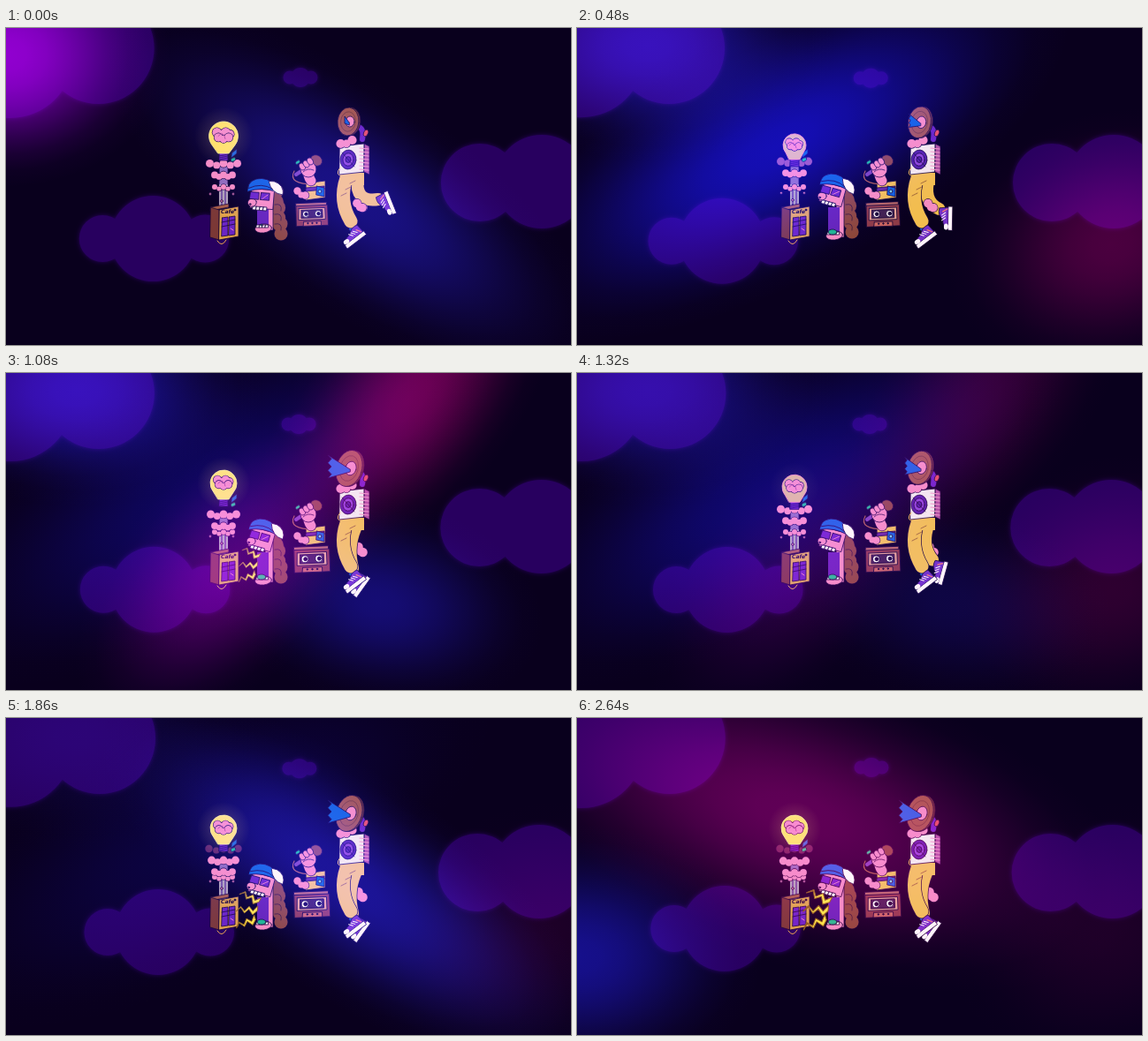
An HTML page with a canvas that plays this animation: 639x359 px, repeating every 2700 ms.

```html
<!DOCTYPE html>
<html lang="en">
<head>
<meta charset="utf-8">
<style>
html, body { margin: 0; width: 100%; height: 100%; overflow: hidden; background: #09001d; }
canvas { display: block; width: 639px; height: 359px; }
</style>
</head>
<body>
<canvas id="stage" width="639" height="359"></canvas>
<script>
const ctx = document.getElementById('stage').getContext('2d');
const LOOP = 2700, STEP = 60, BEAT = LOOP / 7, TAU = Math.PI * 2;
const INK = '#1b0733', PINK = '#f58cc0', BROWN = '#8d4734', PURPLE = '#6a25c4',
      YELLOW = '#f2bd4e', BLUE = '#145fe0', WHITE = '#fff4fa', GREEN = '#20b38c';

const mix = (a, b, k) => a + (b - a) * k;
const clamp = k => Math.min(1, Math.max(0, k));
const range = n => Array.from({ length: n }, (_, i) => i);
// Smooth bump: 1 at the peak, 0 beyond the half-width.
const bump = (x, peak, width) => Math.cos(clamp(Math.abs(x - peak) / width) * Math.PI / 2) ** 2;

function paint(fill, line = INK, width = 0.8) {
  if (fill) { ctx.fillStyle = fill; ctx.fill(); }
  if (line) { ctx.strokeStyle = line; ctx.lineWidth = width; ctx.stroke(); }
}
function poly(fill, points, line) {
  ctx.beginPath();
  points.forEach(([x, y]) => ctx.lineTo(x, y));
  ctx.closePath();
  paint(fill, line);
}
// Box whose right side is shifted vertically by skew.
function slab(fill, x, y, w, h, skew = 0, line = INK) {
  poly(fill, [[x, y], [x + w, y + skew], [x + w, y + skew + h], [x, y + h]], line);
}
function oval(fill, x, y, rx, ry = rx, turn = 0, line = INK) {
  ctx.beginPath();
  ctx.ellipse(x, y, rx, ry, turn, 0, TAU);
  paint(fill, line);
}
function curve(color, width, x0, y0, cx, cy, x1, y1) {
  ctx.beginPath();
  ctx.moveTo(x0, y0);
  ctx.quadraticCurveTo(cx, cy, x1, y1);
  paint(null, color, width);
}
const wire = (color, width, x0, y0, x1, y1) => curve(color, width, x0, y0, x0, y0, x1, y1);
function limb(color, width, ...path) {
  curve(INK, width + 1.4, ...path);
  curve(color, width, ...path);
}
// Row of merged balls along a shallow wave.
function puff(color, x, y, w, n, r, dy = 0) {
  const balls = range(n).map(i => {
    const k = i / (n - 1) - .5;
    return [x + k * w, y + k * dy + (i % 2 ? 1 : -1), r * (i % 2 ? 1 : 1.15)];
  });
  balls.forEach(([bx, by, br]) => oval(INK, bx, by, br + .6, br + .6, 0, null));
  balls.forEach(([bx, by, br]) => oval(color, bx, by, br, br, 0, null));
}
function at(x, y, turn, scale, draw) {
  ctx.save();
  ctx.translate(x, y);
  ctx.rotate(turn);
  ctx.scale(scale, scale);
  draw();
  ctx.restore();
}

function skyCloud(...balls) {
  ctx.fillStyle = ctx.shadowColor = '#28005f';
  ctx.shadowBlur = 5;
  ctx.beginPath();
  for (const [x, y, r] of balls) {
    ctx.moveTo(x + r, y);
    ctx.arc(x, y, r, 0, TAU);
  }
  ctx.fill();
  ctx.shadowBlur = 0;
}
function sky(t) {
  ctx.fillStyle = '#09001d';
  ctx.fillRect(0, 0, 639, 359);
  const sway = Math.cos(TAU * (t - 480) / LOOP), bob = Math.cos(TAU * (t - 1250) / LOOP);
  const x = 168 - 4 * sway, y = 242 + 3.5 * bob, far = 535 + 2 * sway, top = 57 + bob;
  skyCloud([5, 30 - bob, 71], [105 - sway, 23, 63]);
  skyCloud([320 - bob, top, 7.5], [332 - bob, top, 11], [344 - bob, top, 7.5]);
  skyCloud([x - 57, y, 26.5], [x, y, 48.5], [x + 59, y, 27]);
  skyCloud([far, 175, 44], [far + 70, 174, 53]);
}

function beam(rgb, x, y, rx, ry, turn, power) {
  if (power < .01) return;
  const glow = ctx.createRadialGradient(0, 0, 0, 0, 0, 1);
  range(9).forEach(i => glow.addColorStop(i / 8, `rgba(${rgb},${power * bump(i, 0, 8)})`));
  ctx.save();
  ctx.translate(x, y);
  ctx.rotate(turn);
  ctx.scale(rx, ry);
  ctx.fillStyle = glow;
  ctx.fillRect(-1, -1, 2, 2);
  ctx.restore();
}
function lights(t) {
  const near = peak => bump(t, peak, 450);
  const rising = clamp(near(480) + near(1020) * .45 + near(1560));
  const falling = clamp(near(0) * .85 + near(1860));
  const crimson = near(1080), finale = near(2700);
  ctx.globalCompositeOperation = 'screen';
  beam('12,14,172', 225, 135, 370, 150, -.5, rising);
  beam('20,18,150', 80, 20, 210, 130, 0, clamp(rising + crimson * .6));
  beam('20,20,140', 390, 190, 330, 125, .6, falling);
  beam('18,18,140', 420, 260, 190, 120, .2, crimson * .7);
  beam('105,0,58', 455, 30, 230, 120, -.9, crimson);
  beam('85,0,95', 260, 220, 230, 120, -.8, crimson * .9);
  beam('85,0,48', 605, 245, 190, 150, -.3, clamp(near(480) * .8 + near(1560) + near(2340)));
  beam('125,0,180', 0, 30, 185, 150, 0, near(0));
  beam('95,0,68', 250, 110, 400, 170, .3, finale);
  beam('14,16,130', 0, 270, 210, 150, 0, finale);
  ctx.globalCompositeOperation = 'source-over';
}

function bulb(y, r, lit) {
  const halo = ctx.createRadialGradient(246, y, r, 246, y, r * 2);
  halo.addColorStop(0, `rgba(255,210,90,${.12 * lit})`);
  halo.addColorStop(1, 'rgba(255,210,90,0)');
  oval(halo, 246, y, r * 2, r * 2, 0, null);
  const neck = y + r + 2, glass = lit > .5 ? '#ffe04f' : '#ddb27c';
  slab(PURPLE, 241, neck, 10, 9);
  range(3).forEach(i => wire(INK, .7, 241, neck + 4 + i * 2, 251, neck + 2 + i * 2));
  ctx.beginPath();
  ctx.arc(246, y, r, Math.PI * .78, Math.PI * .22);
  ctx.lineTo(252, neck + 1);
  ctx.lineTo(240, neck + 1);
  ctx.closePath();
  paint(glass, lit > .5 ? '#fff08a' : PINK);
  puff(PINK, 246, y - r * .2, r * .9, 4, r * .27);
  puff(PINK, 246, y + r * .15, r * .7, 3, r * .25);
  curve('#9c347e', .7, 240, y, 246, y - 7, 248, y + 3);
}
function cafeTower(beat, open) {
  const dip = bump(beat, .27, .35), late = bump(beat, .86, .1);
  const ring = 155 + 5 * open - 5 * dip + 3 * late;
  slab('#8f6bb8', 241, ring, 10, 48, 0);
  range(3).forEach(i => {
    wire(INK, 2.4, 242 + i * 4, 180, 242 + i * 4, 203);
    wire(WHITE, 1.3, 242 + i * 4, 178, 242 + i * 4, 203);
  });
  puff(PINK, 246, 181, 20, 5, 2.6);
  puff(PINK, 246, ring + 13, 20, 5, 3.4);
  if (late > .5) puff('#612547', 246, 149, 33, 5, 3.6);
  puff(dip > .8 ? '#98539a' : PINK, 246, ring, 31 - 6 * late, 5, 3.9);
  slab(BLUE, 255, 142, 6, 5, -5);
  oval(GREEN, 257, 149, 3, 2, -.5);
  bulb(121 + 12 * dip + 4 * open * (1 - dip), 17 - 4 * dip - 2 * open * (1 - dip), 1 - dip);
  range(3).forEach(i => oval(PINK, 231 + i * 13, 188 + i % 2 * 8 - open * 3, 1.4));

  slab('#a75d42', 231, 203, 21, 4, -4);
  slab('#7b3835', 231, 203, 10, 34, 3);
  slab('#dfa247', 241, 206, 22, 34, -4);
  ctx.fillStyle = INK;
  ctx.font = 'italic bold 6px "DejaVu Sans", sans-serif';
  ctx.fillText('Cafe', 243, 210);
  oval(INK, 259, 206, 1);
  [244, 252].forEach((x, i) => slab(PURPLE, x, 215 - i, 7, 21, -1));
  range(2).forEach(i => wire(INK, .8, 244, 220 + i * 5, 259, 217 + i * 5));
  wire(PINK, 1, 254, 227, 257, 229);
  curve('#e8a34d', 1, 239, 241, 244, 249, 249, 240);
}

// Tapered zigzag from a wide end to a point.
function bolt(x, y, length, turn) {
  at(x, y, turn, length / 22, () => {
    const edge = side => range(6).map(i => [-i * 4.4, (i % 2 ? 3 : -2) + side * (2.6 - i * .5)]);
    poly('#ffe33e', [...edge(1), ...edge(-1).reverse()], '#8a5b12');
  });
}
function head(tilt) {
  at(295, 190, tilt, 1, () => {
    slab(PINK, -18, -7, 26, 22);
    range(4).forEach(i => slab(WHITE, -15 + i * 4, 13, 4, 4));
    oval(PINK, -16, 9, 5, 4.5, -.3);
    oval(INK, -18, 11, 1, .7);
    range(2).forEach(i => slab(PURPLE, -19 + i * 12, -3, 10, 8));
    wire(PINK, .8, -5, 4, 1, -1);
    ctx.beginPath();
    ctx.ellipse(-6, -7, 16, 12, .1, Math.PI * .95, TAU);
    ctx.quadraticCurveTo(-6, -10, -22, -3);
    paint(BLUE);
    ctx.beginPath();
    ctx.ellipse(5, -5, 13, 12, .1, -Math.PI * .6, .1);
    ctx.quadraticCurveTo(5, -3, 1, -16);
    paint(WHITE);
    curve(INK, .8, -21, -7, -7, -15, 6, -8);
  });
}
function shouter(beat, kick) {
  const open = clamp((.88 - kick) / .25), jaw = mix(227, 235, open), up = 4 * open;
  puff(BROWN, 308, 209 - up / 2, 6, 6, 7.5, 46);
  range(3).forEach(i => curve(INK, .6, 304, 200 + i * 11, 313, 198 + i * 11, 311, 207 + i * 11));
  slab(PINK, 293, 190, 9, jaw - 188);
  slab('#6524b6', 284, 203, 13, jaw - 204, 0, null);
  oval(PINK, 291, jaw, 9.5, 5, -.1);
  range(4).forEach(i => slab(WHITE, 283 + i * 3.4, jaw - 4, 3.4, 3));
  oval(GREEN, 289, jaw - 4, 1 + 4 * open, 1 + 2 * open);
  ctx.save();
  ctx.translate(0, -up);
  head(mix(.08, .27, open));
  ctx.restore();
  if (beat > .6 && beat < .95) {
    const size = mix(18, 32, clamp((beat - .76) / .1) ** 2);
    range(3).forEach(i => bolt(286 - i * 2, 208 + i * 10, size, .5 - i * .4));
  }
}

function micStack(open) {
  slab(YELLOW, 339, 176, 22, 19, -3);
  slab('#65299e', 339, 181, 21, 4, -2);
  slab(BLUE, 351, 179, 9, 10, 2);
  oval('#78c5ef', 355, 185, 2);
  puff(PINK, 334, 188, 9, 3, 3.6, 5);
  curve('#a95a3d', 1.2, 326, 162, 318, 177, 349, 177);
  limb(PINK, 11, 342, 162, 341, 168, 345, 173);
  limb('#7b42b6', 4, 328, 166, 340, 158, 350, 151);
  oval(BROWN, 351, 150, 7, 6, .6);
  oval(PINK, 342, 160, 9, 9);
  range(3).forEach(i => oval(PINK, 335 + i * 4.5, 157 - i * 3, 3.2, 4.3, -.5));
  curve(INK, .7, 336, 163, 341, 158, 348, 161);
  oval(GREEN, 330, 152, 3, 1.8, -.6);
  at(346, 211, -.04, 1 + .12 * open, () => {
    slab('#b76761', -18, -13, 35, 4);
    slab('#8e3b45', -18, -10, 36, 23);
    slab('#e6a092', -15, -7, 30, 13);
    slab('#42204d', -12, -5, 24, 9);
    [-7, 7].forEach(x => { oval(WHITE, x, -.5, 3.6); oval(INK, x + .5, -.5, 1.8); });
    slab('#ca655d', -10, 8, 20, 5);
    range(3).forEach(i => oval(INK, -5 + i * 5, 10, .7));
  });
}

function shoe(x, y, turn) {
  at(x, y, turn, 1, () => {
    slab(WHITE, -14, 2, 27, 5);
    ctx.beginPath();
    ctx.moveTo(-13, 2);
    ctx.quadraticCurveTo(-10, -4, -2, -4);
    ctx.quadraticCurveTo(3, -10, 11, -8);
    ctx.lineTo(12, 2);
    paint('#7330c6');
    oval(WHITE, -10, 0, 3.5, 2.5, 0, null);
    range(3).forEach(i => wire(WHITE, 1, i * 3 - 3, -5, i * 3, -1));
    wire('#f47a73', 1.3, 7, -4, 10, 1);
  });
}
function horn(open) {
  const x = 387 + open, y = 106 + 2 * open, rx = 12 + 2.5 * open, ry = 16 + 5 * open, turn = .1 + .2 * open;
  oval('#6e332c', x + 2, y, rx, ry, turn);
  oval('#a15540', x, y, rx, ry, turn);
  oval(null, x, y, rx * .7, ry * .7, turn, '#70382e');
  oval(PINK, x + 2, y, 5 + open, 6 + 2 * open, turn);
  const tip = x + 1, reach = mix(5, 25, open), half = mix(4, 13, open);
  const fringe = range(7).map(i => [tip - reach + (i % 2) * 4 * open, y - 2 + half * (i / 3 - 1)]);
  poly(BLUE, [[tip, y + 1], ...fringe, [tip, y + 4]]);
}
function speakerDancer(kick) {
  const open = 1 - kick;
  puff(PINK, 401, 201, 5, 3, 4.6, 6);
  limb(YELLOW, 14, 398, 170, mix(385, 394, kick), mix(194, 198, kick), mix(392, 421, kick), mix(221, 194, kick));
  if (kick > .4) puff(PINK, 400, 202, 6, 3, 4.2, 5);
  shoe(mix(399, 430, kick), mix(239, 199, kick), mix(-.95, -1.95, kick));
  limb(BLUE, 6, 389, 218, 390, 222, 391, 227);
  limb(YELLOW, 15, 385, 170, 376, 196, 390, 219);
  slab(YELLOW, 378, 164, 27, 14, 0, null);
  range(3).forEach(i => wire('#87502e', .8, 379 + i * 5, 190 - i * 7, 385 + i * 5, 187 - i * 7));
  shoe(393, 236, -.65);

  slab('#f3e6ef', 377, 134, 28, 32, -3);
  slab('#b1529f', 405, 131, 6, 32, 3);
  range(7).forEach(i => wire('#ef9ac6', 1.2, 400, 136 + i * 4, 410, 137 + i * 4));
  range(3).forEach(i => oval(i % 2 ? '#8d45d8' : '#5420a4', 387, 149, 9 - i * 3, 11 - i * 3.8, .1));
  wire(INK, .7, 380, 141, 394, 157);
  curve(YELLOW, 1, 378, 158, 371, 167, 381, 168);

  limb(PURPLE, 6, 399, 112, 405, 114, 403, 126);
  oval('#e54e59', 407, 119, 2.5, 4, .4);
  puff(PINK, 385, 130, 13, 3, 4.4, -4);
  horn(open);
}

const start = performance.now();
function frame(now) {
  const t = Math.floor(Math.max(0, now - start) % LOOP / STEP) * STEP;
  const beat = t % BEAT / BEAT;
  // The leg sinks through most of the beat, then snaps back up.
  const kick = clamp(1 - beat / .8) ** 1.4 + clamp((beat - .85) / .15) ** 2;
  ctx.lineJoin = ctx.lineCap = 'round';
  sky(t);
  cafeTower(beat, 1 - kick);
  shouter(beat, kick);
  micStack(1 - kick);
  speakerDancer(kick);
  lights(t);
  requestAnimationFrame(frame);
}
frame(start);
</script>
</body>
</html>
```
